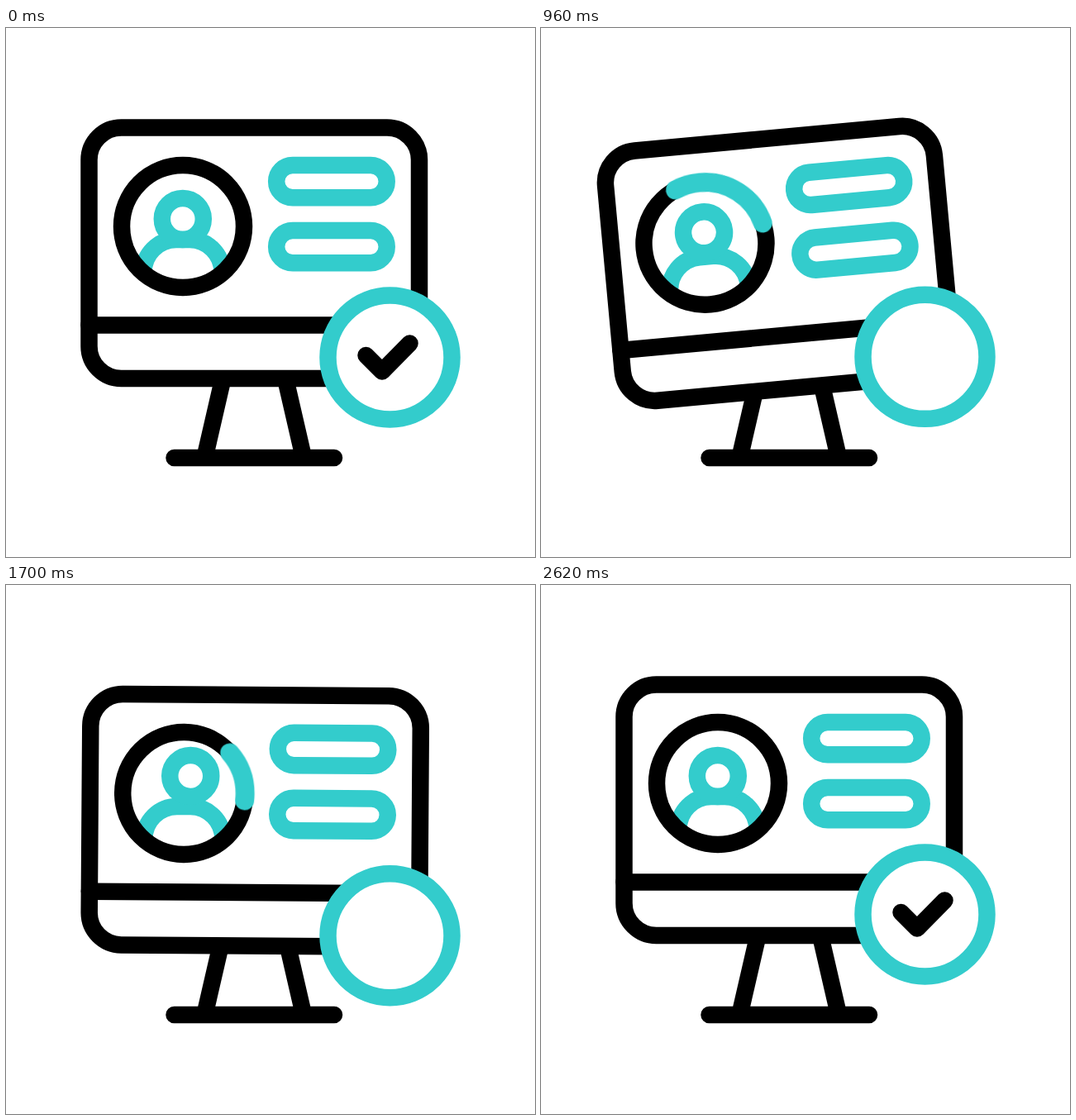
Recreate the animation shown at these times as an HTML page without scripts. Size 640 px wide and 640 px high, loop 3000 ms.

```html
<!DOCTYPE html>
<html lang="en">
<head>
<meta charset="utf-8">
<title>Verified profile</title>
<style>
  :root {
    --teal: #33cccc;
    --sine: cubic-bezier(.37, 0, .63, 1);
    --sine-in: cubic-bezier(.12, 0, .39, 0);
    --sine-out: cubic-bezier(.61, 1, .88, 1);
  }
  html, body { margin: 0; width: 100%; height: 100%; overflow: hidden; background: #fff; }
  svg { display: block; width: 100%; height: 100%; }

  .line { fill: none; stroke: #000; stroke-width: 20.5; stroke-linecap: round; stroke-linejoin: round; }
  .teal { stroke: var(--teal); }
  .solid { fill: #fff; }

  .monitor, .head, .badge, .check, .arc, .ray {
    animation-duration: 3s;
    animation-iteration-count: infinite;
    animation-timing-function: var(--sine);
  }

  .monitor { transform-origin: 295px 413px; animation-name: sway, sink; }
  @keyframes sway {
    0%, 6.667% { rotate: 0deg; }
    25.667% { rotate: -9.8deg; }
    46.667% { rotate: 12deg; }
    65.667% { rotate: -9.3deg; }
    87.333%, 100% { rotate: 0deg; }
  }
  @keyframes sink {
    0%, 6.667% { translate: 0 0; }
    17%, 70% { translate: 0 12.5px; }
    82.667%, 100% { translate: 0 0; }
  }

  .head { animation-name: nod; }
  @keyframes nod {
    0%, 6.667% { translate: 0 0; }
    20% { translate: 0 -22px; }
    33.333% { translate: 0 -4px; }
    53.333% { translate: 11px -13px; }
    68.667% { translate: -15px -4px; }
    87.333%, 100% { translate: 0 0; }
  }

  .badge { animation-name: bob; }
  @keyframes bob {
    0%, 6.667% { translate: 464.5px 398.5px; }
    16.667% { translate: 464.5px 427px; }
    43.333% { translate: 464.5px 380px; }
    58.667% { translate: 464.5px 426px; }
    72.333%, 100% { translate: 464.5px 398.5px; }
  }

  .check { stroke-dasharray: 100 400; animation-name: grow, redraw; }
  @keyframes grow {
    0%, 6.667%, 79.333%, 100% { d: path("M-29 -2.5L-9.5 17L24 -17"); }
    26.667%, 60% { d: path("M-47.6 -4.1L-15.6 27.9L39.4 -27.9"); }
  }
  @keyframes redraw {
    0%, 6.667% { stroke-dashoffset: 0; }
    26.667%, 59.99% { stroke-dashoffset: -102; }
    60% { stroke-dashoffset: 102; }
    79.333%, 100% { stroke-dashoffset: 0; }
  }

  .arc {
    stroke-width: 23;
    animation-name: arc-length, arc-travel, arc-show;
    animation-timing-function: linear, var(--sine), step-end;
  }
  @keyframes arc-length {
    0%, 18.667% { stroke-dasharray: 0 900; animation-timing-function: var(--sine-in); }
    27.333% { stroke-dasharray: 47 900; animation-timing-function: var(--sine-out); }
    42.667% { stroke-dasharray: 147 900; animation-timing-function: var(--sine-in); }
    58% { stroke-dasharray: 48 900; animation-timing-function: var(--sine-out); }
    66.667%, 100% { stroke-dasharray: 0 900; }
  }
  @keyframes arc-travel {
    0%, 27.333% { stroke-dashoffset: 0; }
    66.667%, 100% { stroke-dashoffset: -415; }
  }
  @keyframes arc-show {
    0% { opacity: 0; }
    18.667% { opacity: 1; }
    66.667%, 100% { opacity: 0; }
  }

  .ray {
    animation-name: ray-length, ray-travel, ray-show;
    animation-timing-function: linear, var(--sine), step-end;
  }
  @keyframes ray-length {
    0%, 59.667% { stroke-dasharray: 0 300; animation-timing-function: var(--sine-in); }
    64% { stroke-dasharray: 26 300; animation-timing-function: var(--sine-out); }
    68% { stroke-dasharray: 53 300; animation-timing-function: var(--sine-in); }
    72.167% { stroke-dasharray: 28 300; animation-timing-function: var(--sine-out); }
    76.667%, 100% { stroke-dasharray: 0 300; }
  }
  @keyframes ray-travel {
    0%, 64% { stroke-dashoffset: 0; }
    76.667%, 100% { stroke-dashoffset: -100; }
  }
  @keyframes ray-show {
    0% { opacity: 0; }
    59.667% { opacity: 1; }
    76.667%, 100% { opacity: 0; }
  }
</style>
</head>
<body>
<svg viewBox="0 0 640 640">
  <defs>
    <clipPath id="portrait"><circle cx="214" cy="240" r="74"/></clipPath>
  </defs>

  <path class="line" d="M262.5 424L242 513M338 424L358.500 513M203.500 520H397"/>

  <g class="monitor">
    <rect class="line solid" x="100.500" y="120.500" width="399.500" height="303.500" rx="39"/>
    <path class="line" d="M100.500 359.500H500"/>
    <rect class="line teal" x="327.200" y="166" width="133.500" height="39.300" rx="19.600"/>
    <rect class="line teal" x="327.200" y="245" width="133.500" height="39.300" rx="19.600"/>
    <g clip-path="url(#portrait)">
      <path class="line teal" d="M166.500 300V296A39.500 39.500 0 0 1 206 256H222A39.500 39.500 0 0 1 261.500 296V300"/>
      <circle class="line teal head" cx="213.800" cy="231" r="25"/>
    </g>
    <circle class="line" cx="214" cy="240" r="74"/>
    <path class="line teal arc" pathLength="720"
      d="M288 240a74 74 0 1 0-148 0a74 74 0 1 0 148 0a74 74 0 1 0-148 0a74 74 0 1 0 148 0"/>
  </g>

  <g class="badge">
    <circle class="line teal solid" r="75"/>
    <path class="line check" pathLength="100" d="M-29 -2.500L-9.500 17L24 -17"/>
  </g>

  <path class="line teal ray" pathLength="100" d="M479 86L487 24"/>
  <path class="line teal ray" pathLength="100" d="M518 106L562 62"/>
  <path class="line teal ray" pathLength="100" d="M538 145L600 137"/>
</svg>
</body>
</html>
```
